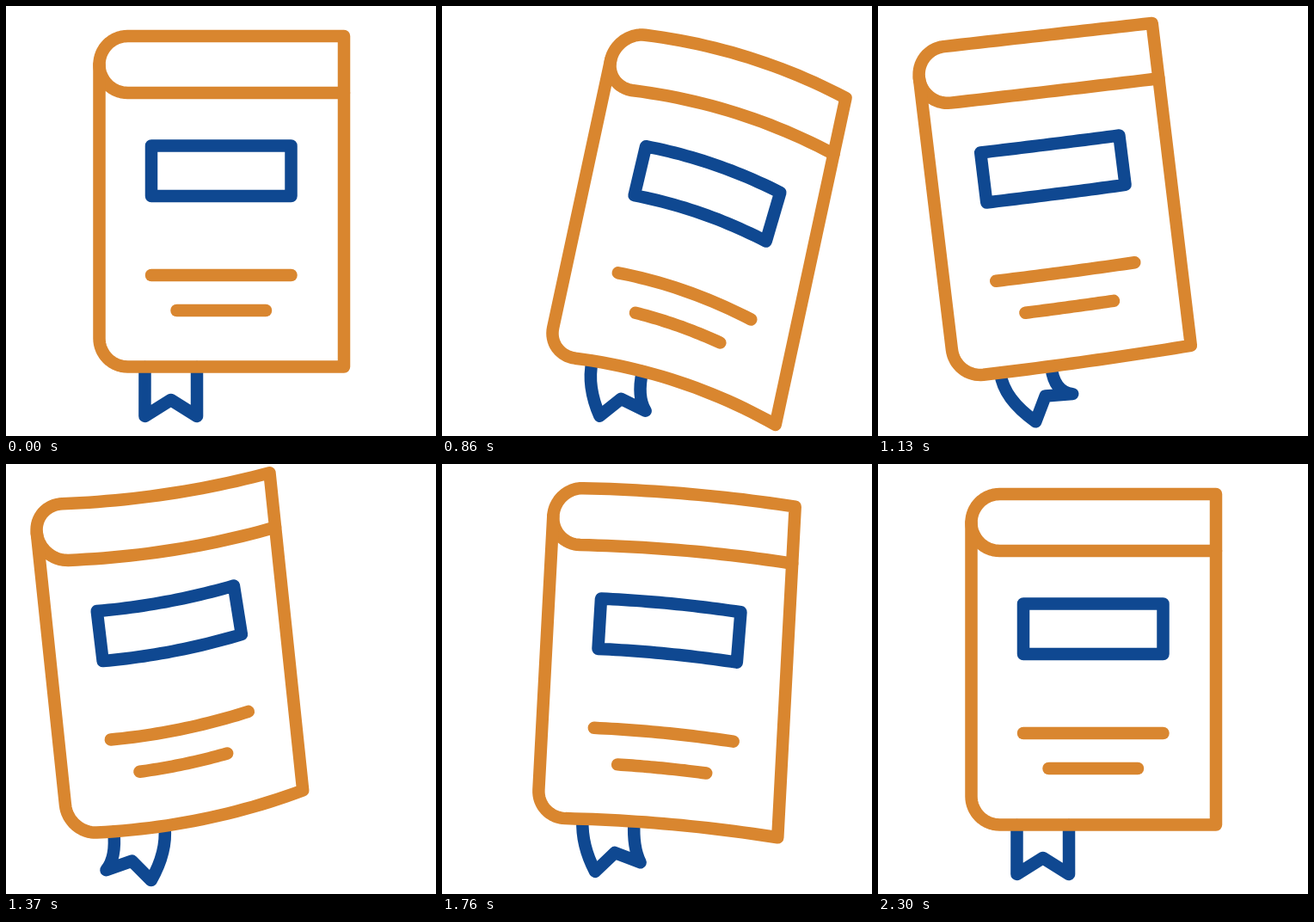
An HTML page with a canvas that plays this animation: 500 px wide and 500 px high, repeating every 2330 ms.

```html
<!DOCTYPE html>
<html lang="en">
<head>
<meta charset="utf-8">
<title>Swaying book</title>
<style>
  html, body { margin: 0; width: 100%; height: 100%; overflow: hidden; background: #fff; }
  canvas { display: block; width: 500px; height: 500px; }
</style>
</head>
<body>
<canvas id="stage" width="500" height="500"></canvas>
<script>
const ctx = document.getElementById('stage').getContext('2d');
const ORANGE = '#d9862f', BLUE = '#0f4891';
const LOOP = 2330, START = 530, STEP = 30, REST = 2180;
const PIVOT = { x: 200, y: 420 };
const SPINE = 108.5, WIDTH = 284.5;
const DEGREE = Math.PI / 180;

// Ease between turning points [time, value], beginning and ending at zero
function swing(time, begin, ...turns) {
  let [t0, v0] = [begin, 0];
  if (time <= begin) return 0;
  for (const [t1, v1] of [...turns, [REST, 0]]) {
    if (time < t1) return v0 + (v1 - v0) * (1 - Math.cos(Math.PI * (time - t0) / (t1 - t0))) / 2;
    [t0, v0] = [t1, v1];
  }
  return 0;
}

// The cover sways first; its drift and bend lag behind, and the ribbon trails the motion
function poseAt(t) {
  const angle = swing(t, 470, [785, 13.9], [1200, -8.4], [1760, 3.04]);
  const dx = swing(t, 470, [830, 12], [1340, -37], [1760, 2]);
  const dy = swing(t, 500, [650, -3], [860, 6], [1250, 1], [1760, -3]);
  const bend = swing(t, 500, [845, 21], [1340, -15], [1760, 7.5]);
  const ribbon = swing(t, START, [690, -16], [1080, 40], [1400, -14], [1760, 11.4]);
  return {
    cos: Math.cos(angle * DEGREE), sin: Math.sin(angle * DEGREE),
    dx, dy, bend,
    arch: 1.8 * bend,
    flare: -0.18 * dx,
    widen: -8 * Math.min(1, Math.abs(angle) / 6),
    ribbon: ribbon * DEGREE
  };
}

function place(pose, x, y) {
  const px = x - PIVOT.x, py = y - PIVOT.y;
  return [PIVOT.x + pose.dx + px * pose.cos - py * pose.sin,
          PIVOT.y + pose.dy + px * pose.sin + py * pose.cos];
}

const across = x => Math.max(0, (x - SPINE) / WIDTH);

function bendAt(pose, u, y) {
  const flare = pose.flare * (227.5 - y) / 192.5;
  return (pose.bend + flare) * u * u + pose.arch * (u * u - u);
}

function coverWarp(pose) {
  return (x, y) => {
    const u = across(x);
    return place(pose, x + pose.widen * u * u, y + bendAt(pose, u, y));
  };
}

// Printed marks bend a little more than the cover outline
function printWarp(pose, middle) {
  return (x, y) => {
    const u = across(x);
    return place(pose, x - (y - middle) * pose.arch * 0.0025 * u,
      y + bendAt(pose, u, y) + 0.38 * pose.arch * u * u);
  };
}

function line(...corners) {
  const points = [corners[0]];
  for (let i = 1; i < corners.length; i++) {
    const [x0, y0] = corners[i - 1], [x1, y1] = corners[i];
    for (let k = 1; k <= 24; k++) points.push([x0 + (x1 - x0) * k / 24, y0 + (y1 - y0) * k / 24]);
  }
  return points;
}

function arc(x, y, r, from, to) {
  return Array.from({ length: 17 }, (_, k) => {
    const a = (from + (to - from) * k / 16) * Math.PI;
    return [x + r * Math.cos(a), y + r * Math.sin(a)];
  });
}

const COVER = [
  ...arc(141.5, 68, 33, 1, 1.5),
  ...line([141.5, 35], [393, 35], [393, 419.5], [141.5, 419.5]),
  ...arc(141.5, 386.5, 33, 0.5, 1)
];
const PAGES = [...arc(141.5, 68, 33, 1, 0.5), ...line([141.5, 101], [393, 101])];
const LABEL = line([169, 162.5], [331.5, 162.5], [331.5, 221], [169, 221], [169, 162.5]);
const LONG_LINE = line([169, 313], [331.5, 313]);
const SHORT_LINE = line([198.5, 354], [302, 354]);

function stroke(points, warp, color, closed) {
  ctx.beginPath();
  for (const [x, y] of points) ctx.lineTo(...warp(x, y));
  if (closed) ctx.closePath();
  ctx.strokeStyle = color;
  ctx.stroke();
}

function drawRibbon(pose, warp) {
  const left = warp(161.5, 420), right = warp(222, 420);
  const sway = Math.min(1, Math.abs(pose.ribbon) / (6 * DEGREE));
  const length = 57 - 2 * sway, half = 30.3 - 3.5 * sway, notch = 19 - 2 * sway;
  const s = Math.sin(pose.ribbon), c = Math.cos(pose.ribbon);
  const baseX = (left[0] + right[0]) / 2, baseY = (left[1] + right[1]) / 2;
  const at = (side, down) => [baseX + side * c + down * s, baseY - side * s + down * c];
  const below = p => [p[0] - 30 * pose.sin, p[1] + 30 * pose.cos];
  ctx.beginPath();
  ctx.moveTo(...left);
  ctx.quadraticCurveTo(...below(left), ...at(-half, length));
  ctx.lineTo(...at(0, length - notch));
  ctx.lineTo(...at(half, length));
  ctx.quadraticCurveTo(...below(right), ...right);
  ctx.strokeStyle = BLUE;
  ctx.stroke();
}

function draw(time) {
  const t = time < START ? 0 : START + Math.floor((time - START) / STEP) * STEP;
  const pose = poseAt(t), cover = coverWarp(pose);
  ctx.fillStyle = '#fff';
  ctx.fillRect(0, 0, 500, 500);
  ctx.lineWidth = 14.5;
  ctx.lineCap = ctx.lineJoin = 'round';
  drawRibbon(pose, cover);
  stroke(PAGES, cover, ORANGE);
  stroke(COVER, cover, ORANGE, true);
  stroke(LABEL, printWarp(pose, 192), BLUE, true);
  stroke(LONG_LINE, printWarp(pose, 313), ORANGE);
  stroke(SHORT_LINE, printWarp(pose, 354), ORANGE);
}

const begin = performance.now();
function tick() {
  draw((performance.now() - begin) % LOOP);
  requestAnimationFrame(tick);
}
tick();
</script>
</body>
</html>
```
